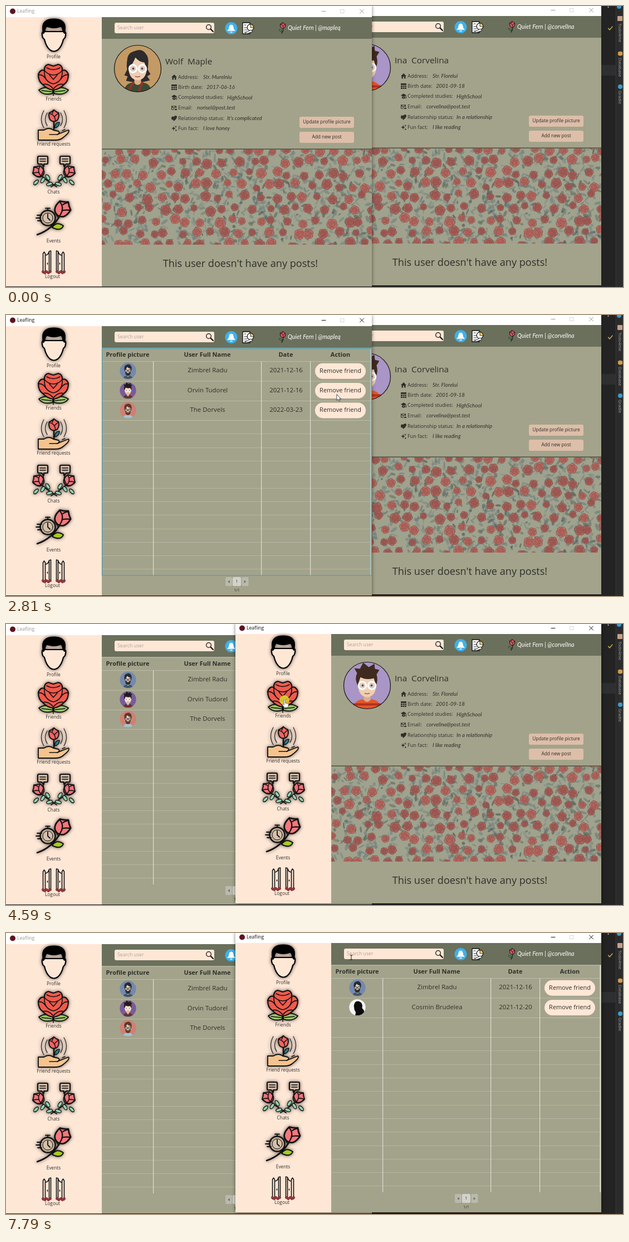
An HTML page with a canvas that plays this animation: 1108x505 px, repeating every 8000 ms.

```html
<!DOCTYPE html>
<html lang="en">
<head>
<meta charset="utf-8">
<title>Leafling</title>
<style>
html, body { margin: 0; width: 100%; height: 100%; overflow: hidden; background: #232323; }
canvas { display: block; }
</style>
</head>
<body>
<canvas id="stage" width="1108" height="505"></canvas>
<script>
const stage = document.getElementById('stage');
const LOOP = 8000, WIDTH = 657, HEIGHT = 504;
const PEACH = '#ffe7d6', OLIVE = '#a3a38b', MOSS = '#6b705c', INK = '#2e2f2a';
const SANS = '"Open Sans", sans-serif', LATO = 'Lato, sans-serif';
let ctx = stage.getContext('2d');

// ---------- drawing helpers ----------
function layer(width, height, draw) {
  const canvas = document.createElement('canvas'), outer = ctx;
  canvas.width = width;
  canvas.height = height;
  ctx = canvas.getContext('2d');
  draw();
  ctx = outer;
  return canvas;
}

function at(x, y, scale, draw, flip = 1) {
  ctx.save();
  ctx.translate(x, y);
  ctx.scale(scale * flip, scale);
  draw();
  ctx.restore();
}

function rect(fill, x, y, w, h, radius = 0) {
  ctx.fillStyle = fill;
  ctx.beginPath();
  ctx.roundRect(x, y, w, h, radius);
  ctx.fill();
}

function path(d, fill, stroke, width = 1) {
  const shape = d instanceof Path2D ? d : new Path2D(d);
  if (fill) { ctx.fillStyle = fill; ctx.fill(shape); }
  if (stroke) {
    ctx.strokeStyle = stroke;
    ctx.lineWidth = width;
    ctx.lineJoin = ctx.lineCap = 'round';
    ctx.stroke(shape);
  }
}

function oval(x, y, rx, ry, fill, stroke, width, angle = 0) {
  const shape = new Path2D();
  shape.ellipse(x, y, rx, ry, angle, 0, Math.PI * 2);
  path(shape, fill, stroke, width);
}

const circle = (x, y, r, fill, stroke, width) => oval(x, y, r, r, fill, stroke, width);

function text(string, x, y, size, { color = INK, align = 'left', style = '', family = SANS } = {}) {
  ctx.font = `${style} ${size}px ${family}`;
  ctx.fillStyle = color;
  ctx.textAlign = align;
  ctx.textBaseline = 'middle';
  ctx.fillText(string, x, y);
}

function bloom(x, y, r, fill, line, width, turn = 0) {
  for (let i = 0; i < 5; i++) {
    const a = turn + i * Math.PI * .4;
    circle(x + r * .45 * Math.cos(a), y + r * .45 * Math.sin(a), r * .55, fill, line, width);
  }
  circle(x, y, r * .5, fill, line, width);
  const curl = new Path2D();
  curl.arc(x, y, r * .24, turn, turn + 4.5);
  path(curl, null, line, width);
}

function random(seed) {
  return () => (seed = (seed * 16807) % 2147483647) / 2147483647;
}

// ---------- sidebar ----------
function bud(x, y, s, color) {
  at(x, y, s, () => {
    path('M-9-5Q-4-7 0-11Q4-7 9-5Q11 10 0 11Q-11 10-9-5Z', color, '#111', 2);
    path('M-8-4Q2-2 3 10M8-4Q2 0 1 3M0-10Q-3-6-3-4', null, '#111', 1.6);
  });
}

function gate() {
  path('M-19 20V-15L-17-18L-15-15V19M-15-12Q-10-12-8-19L-5-20V18L-8 19V-17M-11 2V4', null, '#111', 1.6);
  for (let i = 0; i < 5; i++) circle(-19 + i * 3.2, 17.5 + (i % 2) * 2, 2.2, '#a23a40', '#6a2428', .7);
}

function chatSide() {
  path('M13 270H27Q29 270 29 272V282Q29 284 27 284H22L18 288V284H13Q11 284 11 282V272Q11 270 13 270Z', '#cdb7a2', '#111', 2.2);
  path('M15 275H25M15 279H25', null, '#111', 1.6);
  path('M25 303Q14 313-5 325', null, '#111', 2);
  for (const [x, y, a] of [[20, 313, 1], [11, 308, -1], [8, 320, .3], [32, 317, .8]])
    oval(x, y, 5.5, 2.8, '#8fd3ad', '#111', 1.3, a);
  at(28, 297, 1, () => { ctx.rotate(.8); bud(0, 0, 1, '#f2727a'); });
  path('M20 287Q16 296 24 306Q32 308 38 301', null, '#111', 1.8);
}

function sidebarIcons() {
  path('M67 46Q63 47 66 57L69 60Q72 73 79 79Q86 84 93 79Q100 73 103 60L106 57Q109 47 105 46Z', PEACH, '#000', 2.2);
  path('M67 50C62 31 69 23 86 23C103 23 110 31 105 50L102 46Q102 41 99 37Q86 42 73 37Q70 41 70 46Z', '#000', '#000', 1);

  path('M84 149Q70 143 59 151Q67 162 84 157ZM86 149Q100 143 112 151Q104 162 86 157Z', '#9bc46a', '#111', 2);
  path('M85 145V161M64 152L82 154M106 152L88 154', null, '#111', 1.5);
  path('M58 123Q62 113 69 116Q68 107 76 105L85 108L94 105Q102 107 101 116Q108 113 112 123Q112 136 104 141Q96 150 85 151Q74 150 66 141Q58 136 58 123Z', '#ef5a4c', '#111', 2.2);
  path('M69 116Q76 124 85 124Q94 124 101 116M73 111Q85 118 97 111M69 117Q68 136 85 140Q102 136 101 117M58 124Q66 122 72 132M112 124Q104 122 98 132M66 141Q76 138 85 149Q94 138 104 141M78 124L85 132L92 124', null, '#111', 1.6);

  path('M86 206V225', null, '#111', 2.5);
  path('M87 219Q88 209 96 209Q96 218 87 219Z', '#2c7c89', '#111', 1.4);
  bud(86, 197, .95, '#f4635f');
  path('M58 223H68Q77 217 85 223L94 225Q98 228 92 231L112 223Q116 226 103 236Q98 241 88 241H58Z', '#f6c38e', '#111', 1.8);
  path('M78 231H93M101 224L106 222', null, '#111', 1.5);
  path('M74 192Q67 204 74 215M68 188Q59 204 68 219M98 192Q105 204 98 215M104 188Q113 204 104 219', null, '#333', 1.4);

  for (const side of [-1, 1]) at(86, 0, 1, chatSide, side);

  path('M56 411Q83 402 98 375', null, '#111', 2.6);
  path('M83 398Q91 386 103 395Q98 406 83 398Z', '#a8c91f', '#111', 2);
  path('M88 371L94 381L98 376Z', '#80a820', '#111', 1.6);
  at(102, 364, 1.4, () => { ctx.rotate(.7); bud(0, 0, 1, '#f4777b'); });
  circle(75, 381, 13.5, '#c0aa94', '#111', 2.4);
  circle(75, 381, 9, '#d5c0aa', '#111', 1);
  path('M75 374V381L79 385M75 367V364M71 363.5H79M56 376H64M54 381H62M57 386H64', null, '#111', 1.8);
}

const icons = layer(172, HEIGHT, sidebarIcons);
const MENU = [['Profile', 91.5], ['Friends', 168], ['Friend requests', 249], ['Chats', 335], ['Events', 423], ['Logout', 487]];

function sidebar() {
  rect(PEACH, 0, 20, 172, 484);
  ctx.filter = 'drop-shadow(0 0 3px rgba(0,0,0,.65))';
  ctx.drawImage(icons, 0, 0);
  ctx.filter = 'none';
  for (const side of [-1, 1]) at(85.5, 460, 1, gate, side);
  for (const [label, y] of MENU) text(label, label === 'Logout' ? 83.5 : 85.5, y, 8.3, { align: 'center' });
}

// ---------- portraits ----------
function portrait(x, y, r, { back, hair, shirt, long, spiky, beard, silhouette }) {
  at(x, y, r / 42, () => {
    circle(0, 0, 42, back);
    ctx.save();
    ctx.clip(new Path2D('M-42 0A42 42 0 1 1 42 0A42 42 0 1 1-42 0Z'));
    if (silhouette) {
      path('M-18-8Q-14-36 8-31Q30-24 24 4Q40 18 37 42H-12Q-4 24-15 14Z', '#0b0b0b');
    } else {
      if (long) path('M-13-26Q-22-14-19 2L-24 12L-18 14L-21 22L-10 24H10L22 21L17 14L23 10L18 2Q21-16 11-26Z', hair);
      path('M-25 42Q-23 26-8 25H8Q23 26 25 42Z', shirt);
      path('M-6 17H6V26Q0 33-6 26Z', '#dcae8b');
      if (long) path('M-8 25L-18 42M8 25L2 42', null, '#8f3428', 4);
      path('M-16-10Q-18 9-10 17Q0 25 10 17Q18 9 16-10Q8-23-6-20Z', '#efcfb0');
      if (beard) path('M-15 3Q-14 25 0 26Q14 25 15 3Q8 13 0 10Q-8 13-15 3Z', hair);
      path(spiky
        ? 'M-17 0Q-23-13-18-22L-23-31L-13-30L-7-41L3-33L13-39L14-30L22-28L17-20Q20-9 16 0L12-13Q-2-9-12-15Z'
        : 'M-17 2Q-24-27-7-31Q8-38 15-26Q22-18 17 2L12-11Q2-12-4-20Q-9-8-17 2Z', hair);
      for (const side of [-1, 1]) {
        circle(side * 8.5, 0, 6.8, 'rgba(215,205,200,.8)', beard ? '#26313a' : '#fff', 2.8);
        circle(side * 8, 0, 1.9, '#6b4a3c');
      }
      path('M-4 14Q0 16 4 14', null, '#a45a4b', 1.6);
      if (spiky) path('M-24 34H24', null, '#b3301f', 4);
    }
    ctx.restore();
    if (r > 20) circle(0, 0, 42, null, '#15130f', 1.2);
  });
}

const LOOKS = {
  scholar: { back: '#7489ae', hair: '#252a33', shirt: '#3f566f', beard: true },
  rocker: { back: '#795b9b', hair: '#211c20', shirt: '#353039', spiky: true },
  bearded: { back: '#cf8074', hair: '#5d392b', shirt: '#9ec6d5', beard: true },
  shade: { back: '#f4f4f4', silhouette: true }
};

// ---------- content ----------
const FACTS = [['Address:', 128, 354], ['Birth date:', 146, 360], ['Completed studies:', 164.5, 397],
  ['Email:', 183, 343], ['Relationship status:', 202, 397], ['Fun fact:', 220, 354]];
const FACT_ICONS = [
  'M-5 0L0-5L5 0H3.5V4.5H1V1H-1V4.5H-3.5V0Z',
  'M-5-5H5V-2H-5ZM-5-1H-2V1.5H-5ZM-1.2-1H1.6V1.5H-1.2ZM2.4-1H5V1.5H2.4ZM-5 2.4H-2V5H-5ZM-1.2 2.4H1.6V5H-1.2ZM2.4 2.4H5V5H2.4Z',
  'M-5-2L0-5L5-2L0 1ZM-3 0V3Q0 5 3 3V0L0 2ZM4-1H5V4H4Z',
  'M-5-3.5H4V1H3V-1.5L-.5 1.5L-4-1.5V2.5H0V3.5H-5ZM-3.5-2.5L-.5 0L2.5-2.5ZM1 2H5V4H1Z',
  'M-5 0Q-5-5-1-3Q4-7 5-3Q5 1-1 5L-2 2L-4 3Z',
  'M-1-4L0-1L3 0L0 1L-1 4L-2 1L-5 0L-2-1ZM3-5L3.6-3.6L5-3L3.6-2.4L3-1L2.4-2.4L1-3L2.4-3.6ZM3 2L5 3.5L3 5L2 3.5Z'
];

const roses = layer(485, 171, () => {
  const rnd = random(4271);
  rect('#9fa28d', 0, 0, 485, 171);
  for (let i = 0; i < 1000; i++) {
    ctx.globalAlpha = .3 + rnd() * .4;
    oval(rnd() * 485, rnd() * 171, 2 + rnd() * 5, 1 + rnd() * 2, rnd() < .75 ? '#6d7f7f' : '#505c55', null, 0, rnd() * 3);
  }
  ctx.globalAlpha = .82;
  for (let row = 0; row < 9; row++)
    for (let col = 0; col < 20; col++)
      bloom(col * 26 + (row % 2) * 13 + rnd() * 14 - 9, row * 21.5 + rnd() * 12 - 6, 6 + rnd() * 4,
        rnd() < .5 ? '#b8655d' : '#a65a54', '#7c4b46', .7, rnd() * 6);
});

function header(handle) {
  rect(MOSS, 172, 20, 485, 39);
  rect(PEACH, 195, 30, 179, 19, 3);
  text('Search user', 200, 40, 8.7, { color: '#aaa39a' });
  circle(364, 38, 4.3, null, '#111', 1.3);
  path('M367.5 41.5L372 46', null, '#111', 2.2);
  circle(404.5, 40, 11, '#3eb1ea');
  path('M398 44Q401 42 401 38Q401 34 404.5 34Q408 34 408 38Q408 42 411 44Z', '#fff', '#fff', 1);
  path('M403 47H406', null, '#fff', 1.6);
  path('M425 30H438V50H425Z', '#fff', '#111', 1.3);
  path('M428 34H431M428 39H433M428 43H433M428 47H435', null, '#333', 1.2);
  circle(439, 38.5, 5.8, '#fff', '#111', 1.2);
  path('M439 38.5V32.7A5.8 5.8 0 0 1 444.8 38.5Z', '#efc96b', '#111', .8);
  path('M430 48L440 43L443 46L432 50Z', '#fff', '#111', .9);
  path('M497 39Q499 44 495 49', null, '#1f2b20', 1.5);
  oval(493, 44, 3, 1.4, '#4e8b5a', '#222', .7, .5);
  bud(497, 35, .5, '#dc5260');
  text(handle, 506, 40, 10.6, { color: '#fff', style: 'italic', family: LATO });
}

function profile(user) {
  portrait(236.5, 112.5, 42, user.look);
  text(user.name, 286, 101, 15.3);
  FACTS.forEach(([label, y, valueX], i) => {
    at(302, y, 1, () => path(FACT_ICONS[i], INK));
    text(label, 309, y + .5, 9.1);
    text(user.facts[i], valueX, y + .5, 9.7, { style: 'italic', family: LATO });
  });
  [['Update profile picture', 199], ['Add new post', 226]].forEach(([label, y]) => {
    rect('#ddbea9', 527, y, 98, 20, 3);
    text(label, 576, y + 10, 8.4, { align: 'center' });
  });
  ctx.drawImage(roses, 172, 258);
  rect('#3e4033', 172, 256.5, 485, 1.2);
  text("This user doesn't have any posts!", 421, 464, 18.1, { align: 'center' });
}

function friendTable(user) {
  const center = { align: 'center' };
  [['Profile picture', 218.5], ['User Full Name', 361.5], ['Date', 502.5], ['Action', 600.5]]
    .forEach(([label, x]) => text(label, x, 72, 11, { align: 'center', style: 'bold' }));
  rect('#bbbaa7', 172, 59.5, 485, 1);
  for (const y of [83, 118.5, 154, 189]) rect('#bcbba8', 172, y, 483, 1);
  for (let y = 213.4; y < 466; y += 24.3) rect('#b6b5a1', 172, Math.round(y), 483, 1);
  for (const x of [264, 458, 546]) rect('#dddcd2', x, 83, 1.2, 385);
  rect('#e6e5dd', 654.5, 60, 1.5, 408);
  user.friends.forEach(([name, date, look], i) => {
    const y = 100.3 + i * 35.3;
    portrait(219, y, 14.7, LOOKS[look]);
    text(name, 362, y, 11.4, center);
    text(date, 503, y, 11.4, center);
    rect(PEACH, 555, y - 13.5, 91, 28, 14);
    text('Remove friend', 600.5, y + .7, 11, center);
  });
  rect('#b9b9ae', 394, 471, 12, 16, 2);
  rect('#b9b9ae', 423.5, 471, 12, 16, 2);
  rect('#d2d2cb', 407, 471, 15, 16, 2);
  path('M402 476.5V482L398 479.3ZM427.5 476.5V482L431.5 479.3Z', '#77776f');
  text('1', 414.5, 479, 7.5, center);
  text('1/1', 414.5, 495, 7, center);
}

function makeWindow(x, y, user) {
  const view = content => layer(WIDTH, HEIGHT, () => {
    rect('#fff', 0, 0, WIDTH, 20);
    rect(OLIVE, 172, 20, 485, 484);
    sidebar();
    header(user.handle);
    content(user);
  });
  return { x, y, profile: view(profile), table: view(friendTable) };
}

const left = makeWindow(0, 0, {
  name: 'Wolf  Maple', handle: 'Quiet Fern | @mapleq',
  look: { back: '#c39a65', hair: '#2d2b2b', shirt: '#3c4a33', long: true },
  facts: ['Str. Murelniu', '2017-06-16', 'HighSchool', 'norisel@post.test', "It's complicated", 'I love honey'],
  friends: [['Zimbrel Radu', '2021-12-16', 'scholar'], ['Orvin Tudorel', '2021-12-16', 'rocker'], ['The Dorvels', '2022-03-23', 'bearded']]
});
const right = makeWindow(412, -2, {
  name: 'Ina  Corvelina', handle: 'Quiet Fern | @corvelIna',
  look: { back: '#a995c6', hair: '#3f2a20', shirt: '#e2572b', spiky: true },
  facts: ['Str. Florelui', '2001-09-18', 'HighSchool', 'corvelina@post.test', 'In a relationship', 'I like reading'],
  friends: [['Zimbrel Radu', '2021-12-16', 'scholar'], ['Cosmin Brudelea', '2021-12-20', 'shade']]
});

const desktop = layer(1108, 505, () => {
  rect('#232323', 0, 0, 1108, 505);
  rect('#2d2f30', 1069, 106, 26, 19);
  rect('#2b2b2b', 1095, 0, 13, 505);
  rect('#383838', 1094.5, 0, 1, 505);
  circle(1081.5, 2, 1, '#ddd');
  path('M1081.5 40L1084 43L1089 37', null, '#c0b45a', 1.4);
  circle(1101, 1, 4, '#3e9ccb');
  rect('#c5a189', 1098, 18, 9, 9, 1);
  path('M1099 83V88Q1103 91 1107 88V83Q1103 80 1099 83Z', '#d59a4b');
  circle(1103, 145, 4, '#3e9ccb');
  [['Todo4me', 31], ['Database', 93], ['Gradle', 152]].forEach(([label, y]) => at(1102, y, 1, () => {
    ctx.rotate(Math.PI / 2);
    text(label, 0, 0, 7.8, { color: '#a3a3a3' });
  }));
});

function drawWindow(win, view, { active, front, focused }) {
  at(win.x, win.y, 1, () => {
    ctx.shadowColor = 'rgba(0,0,0,.5)';
    ctx.shadowBlur = front ? 6 : 2;
    ctx.drawImage(win[view], 0, 0);
    ctx.shadowBlur = 0;
    ctx.shadowColor = 'transparent';
    const color = active ? '#111' : '#999';
    circle(12, 9.5, 5, '#5c1520');
    text('Leafling', 20, 10, 8.6, { color });
    path('M567 9.5H574', null, color, 1);
    path('M601 6.5H607V12.5H601Z', null, '#ccc', .8);
    path('M635.5 6L642.5 13M642.5 6L635.5 13', null, color, 1);
    if (focused) path('M172.5 60.5H656V468H172.5Z', null, '#379fbd', 1.2);
  });
}

// ---------- pointer ----------
const TRACK = [[120, 1050, 500], [660, 899, 150], [1040, 899, 150], [1700, 90, 135], [2120, 90, 135],
  [2810, 593, 143], [2910, 712, 150], [2950, 712, 150], [3700, 568, 135], [3720, 553, 136], [4140, 500, 137],
  [4680, 500, 137], [5050, 650, 140], [5390, 620, 118], [5700, 575, 65], [5900, 553, 42], [6060, 556, 30],
  [6250, 556, 30], [6610, 620, 44], [8000, 620, 44]];
const CLICKS = [[940, 1040], [1760, 1890], [2930, 2980], [4590, 4680], [6540, 6610]];

// Monotone cubic through the track, so that rests stay still.
function pointerAt(t) {
  const i = Math.max(0, TRACK.findIndex(key => key[0] > t) - 1);
  const span = TRACK[i + 1][0] - TRACK[i][0], u = (t - TRACK[i][0]) / span;
  return [1, 2].map(axis => {
    const slope = k => k < 0 || k > TRACK.length - 2 ? 0 :
      (TRACK[k + 1][axis] - TRACK[k][axis]) / (TRACK[k + 1][0] - TRACK[k][0]);
    const tangent = k => {
      const a = slope(k - 1), b = slope(k);
      return a * b <= 0 ? 0 : 2 * a * b / (a + b);
    };
    const p = TRACK[i][axis], q = TRACK[i + 1][axis];
    return p + (q - p) * u * u * (3 - 2 * u)
      + span * u * (1 - u) * (tangent(i) * (1 - u) - tangent(i + 1) * u);
  });
}

function drawPointer(t, front) {
  const [x, y] = pointerAt(t), localX = x - front.x, localY = y - front.y;
  const inside = (x0, y0, x1, y1) => localX > x0 && localX < x1 && localY > y0 && localY < y1;
  if (CLICKS.some(([from, to]) => t >= from && t < to)) circle(x, y, 9, 'rgba(222,211,45,.85)');
  at(x, y, 1, () => {
    if (inside(57, 103, 115, 165))
      path('M-1 0Q0-2 1.3 0V5L6 6Q8 7 7 10L6 13H0L-4 8Q-4 6-1 8Z', '#fff', '#555', .7);
    else if (inside(195, 30, 360, 49))
      path('M-2-4H2M0-4V4M-2 4H2', null, '#222', 1);
    else
      path('M0 0V10.5L2.5 8.4L4.2 12L5.8 11.3L4.2 7.8H7.4Z', '#fff', '#222', .8);
  });
}

function render(t) {
  const rightInFront = (t >= 940 && t < 1760) || t >= 2930;
  const leftView = t >= 2120 ? 'table' : 'profile', rightView = t >= 4950 ? 'table' : 'profile';
  const drawLeft = () => drawWindow(left, leftView,
    { active: t >= 1760 && !rightInFront, front: !rightInFront, focused: t >= 2120 && t < 2930 });
  const drawRight = () => drawWindow(right, rightView,
    { active: rightInFront, front: rightInFront, focused: t >= 4950 && t < 6610 });
  ctx.drawImage(desktop, 0, 0);
  if (rightInFront) { drawLeft(); drawRight(); } else { drawRight(); drawLeft(); }
  if (t >= 120) drawPointer(t, rightInFront ? right : left);
}

const start = performance.now();
function tick() {
  render((performance.now() - start) % LOOP);
  requestAnimationFrame(tick);
}
tick();
</script>
</body>
</html>
```
